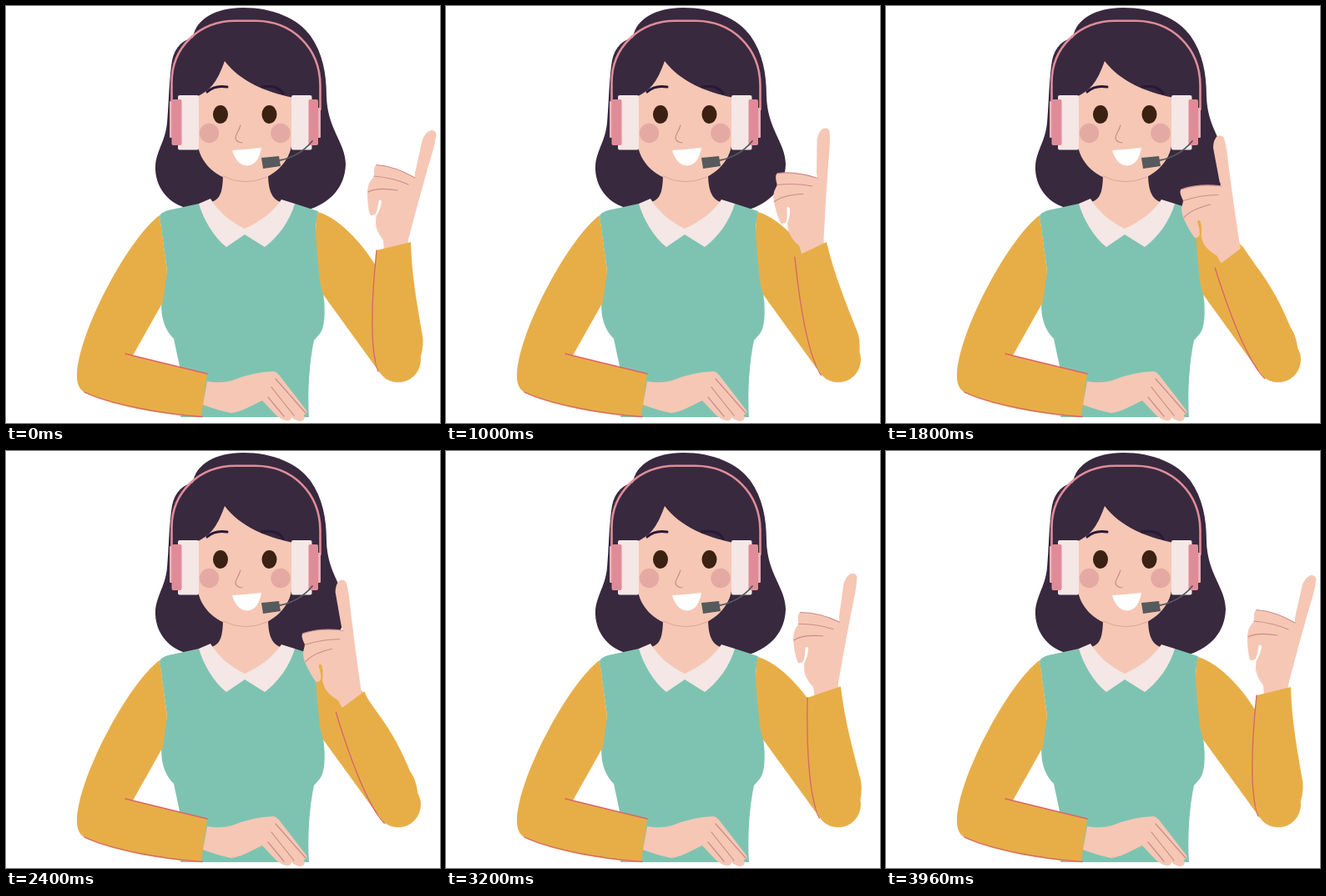
Animation of 520 by 500 pixels, one loop 4 s. Source, as an HTML page with a canvas:

```html
<!DOCTYPE html>
<html lang="en">
<head>
<meta charset="utf-8">
<title>Support agent</title>
<style>
  html, body { margin: 0; width: 100%; height: 100%; overflow: hidden; background: #fff; }
  canvas { display: block; }
</style>
</head>
<body>
<canvas id="stage" width="520" height="500"></canvas>
<script>
const ctx = document.getElementById('stage').getContext('2d');

const LOOP = 4000, STEP = 40, SWING = 23.5 * Math.PI / 180;
const ELBOW = { x: 470, y: 424 };

const C = {
  hair: '#38293f', brow: '#2a1935', skin: '#f6c7b5', crease: '#c98d8a', cheek: '#e5a9a3',
  eye: '#3b2112', white: '#ffffff', pad: '#f4e7e5', pink: '#e08c98', mic: '#565a5d',
  teal: '#7ec3b1', sleeve: '#e7ae48', seam: '#d9646a'
};

function fill(d, color) {
  ctx.fillStyle = color;
  ctx.fill(new Path2D(d));
}

function line(d, color, width) {
  ctx.strokeStyle = color;
  ctx.lineWidth = width;
  ctx.lineCap = ctx.lineJoin = 'round';
  ctx.stroke(new Path2D(d));
}

function oval(x, y, rx, ry, color) {
  ctx.fillStyle = color;
  ctx.beginPath();
  ctx.ellipse(x, y, rx, ry, 0, 0, 7);
  ctx.fill();
}

function box(x, y, w, h, r, color) {
  ctx.fillStyle = color;
  ctx.beginPath();
  ctx.roundRect(x, y, w, h, r);
  ctx.fill();
}

function drawHair() {
  fill('M216 242C192 236 178 214 179 192C180 174 191 162 193 140C195 118 195 96 198 72' +
    'C200 53 208 42 224 38C227 16 251 2 284 2C320 2 350 15 365 36C379 56 384 80 384 108' +
    'C385 148 407 164 407 190C406 218 388 235 366 243L330 250L245 250Z', C.hair);
}

function drawBody() {
  fill('M184 252Q185 248 194 245L231 237L346 237L374 246L371 265L377 330C383 352 384 384 376 393' +
    'L369 401C365 420 361 452 363 493L209 493L211 446L201 399C184 382 185 358 188 344' +
    'L193 318Z', C.teal);
  fill('M260 200C260 222 257 232 246 235L240 240L286 274L336 240L329 235C318 231 314 220 314 200Z', C.skin);
  fill('M245 231L231 237C237 257 249 277 264 289L286 274L310 289C326 277 340 258 346 237' +
    'L330 232C320 247 304 259 286 267C269 259 254 246 245 231Z', C.pad);
}

function drawFace() {
  fill('M262 66C254 88 247 100 230 108L230 168C234 192 258 211 286 211C316 211 338 190 342 168' +
    'L342 109.500C312 103 281 91 262 66Z', C.skin);
  line('M260 204Q286 217 313 205', '#dfa595', 1);
  line('M241 103Q250 94.500 265 97', C.brow, 3);
  line('M307 97Q325 94 332 105', C.brow, 3);
  for (const x of [257, 315.5]) oval(x, 130, 9, 11, C.eye);
  for (const x of [243.5, 329]) oval(x, 152.5, 11.7, 11.7, C.cheek);
  line('M281 143C279 150 275 154 275 158Q275 163 283 164', C.crease, 1.2);
  fill('M271 173Q289 172 306 170C304 182 299 191 289 191.500C279 191 274 183 271 173Z', C.white);
}

function drawHeadset() {
  line('M198.500 116L198.500 92C198.500 49 232 17.800 275 17.800L299 17.800' +
    'C343 18 376 50 376.500 95L376.500 124', C.pink, 2.6);
  box(196, 114, 5, 44, 1, '#ecb0b3');
  box(373, 122, 4, 36, 1, '#ecb0b3');
  box(206, 107, 25, 65.5, 2, C.pad);
  box(342, 107, 24.5, 65.5, 2, C.pad);
  box(198.5, 112, 12, 55, 2, C.pink);
  box(362.5, 112, 11.5, 55, 2, C.pink);
  line('M328 185C344 182 357 174 367 162', C.mic, 1.8);
  fill('M306 182L327 180L329 192L308 195Z', C.mic);
}

function drawRestingArm() {
  fill('M184 251C149 276 88 387 85 441Q84 458 95 464C121 477 180 490 234 493L241 441L152 419' +
    'L188 355L193 318Z', C.sleeve);
  line('M143 417L241 441', C.seam, 1.3);
  line('M94 463C126 478 188 489 235 492.500', C.seam, 1.3);
  fill('M241 450Q257 453 271 449Q295 439 321 438Q326 440 330 446L360 485Q362 489 357 490' +
    'Q360 497 352 498Q346 497 342 493Q342 498 335 497Q328 495 322 489L307 473' +
    'C298 477 284 486 270 488Q254 485 236 478Z', C.skin);
  for (const d of ['M323 447L359 488', 'M318 457L345 491', 'M314 469L333 492'])
    line(d, C.crease, 1.2);
}

function drawUpperArm() {
  fill('M374 247C398 254 424 281 443 311C466 341 486 380 497 424L470 450L455 447L443 433' +
    'L380 346Q376 336 374 310L371 275Q371 255 374 247Z', C.sleeve);
}

function drawForearm(angle) {
  ctx.save();
  ctx.translate(ELBOW.x, ELBOW.y);
  ctx.rotate(angle);
  ctx.translate(-ELBOW.x, -ELBOW.y);

  fill('M453 294L452 281Q443 269 443 260L443.500 252Q449 243 450 235Q449 230 446.500 234' +
    'Q446 242 443 249Q439 252.500 436 250Q433 240 433 222Q434 212 438 208L441 204' +
    'Q440 190 445 190.500Q466 192 490 206L490 200L499 160Q503 151 509 149' +
    'Q515 149 515.500 154Q514 167 508 185L494 235L482 280L481 295Z', C.skin);
  line('M444 190.500Q466 192 490 206', C.crease, 1.1);
  line('M441 204Q464 206 482 214', C.crease, 1.1);
  line('M434 223Q445 217 469 221', C.crease, 1.1);

  fill('M444 293L485 283C486 323 493 360 499 395Q501 405 497 420L470 424L446 438' +
    'C436 412 438 352 444 293Z', C.sleeve);
  line('M444 293C438 352 436 412 446 438', C.seam, 1.3);
  ctx.restore();
  oval(ELBOW.x, ELBOW.y, 27, 27.3, C.sleeve);
}

// Cubic ease with handles (.75, 0) and (.25, 1), solved by bisection.
function ease(x) {
  let lo = 0, hi = 1;
  for (let i = 0; i < 24; i++) {
    const s = (lo + hi) / 2, r = 1 - s;
    if (2.25 * r * r * s + 0.75 * r * s * s + s * s * s < x) lo = s; else hi = s;
  }
  return lo * lo * (3 - 2 * lo);
}

function armAngle(t) {
  const p = t / (LOOP / 2);
  return -SWING * ease(p < 1 ? p : 2 - p);
}

function drawScene(t) {
  ctx.fillStyle = C.white;
  ctx.fillRect(0, 0, 520, 500);
  drawHair();
  drawBody();
  drawFace();
  drawHeadset();
  drawRestingArm();
  drawUpperArm();
  drawForearm(armAngle(t));
}

const start = performance.now();
function tick() {
  const t = (performance.now() - start) % LOOP;
  drawScene(Math.floor(t / STEP) * STEP);
  requestAnimationFrame(tick);
}
tick();
</script>
</body>
</html>
```
